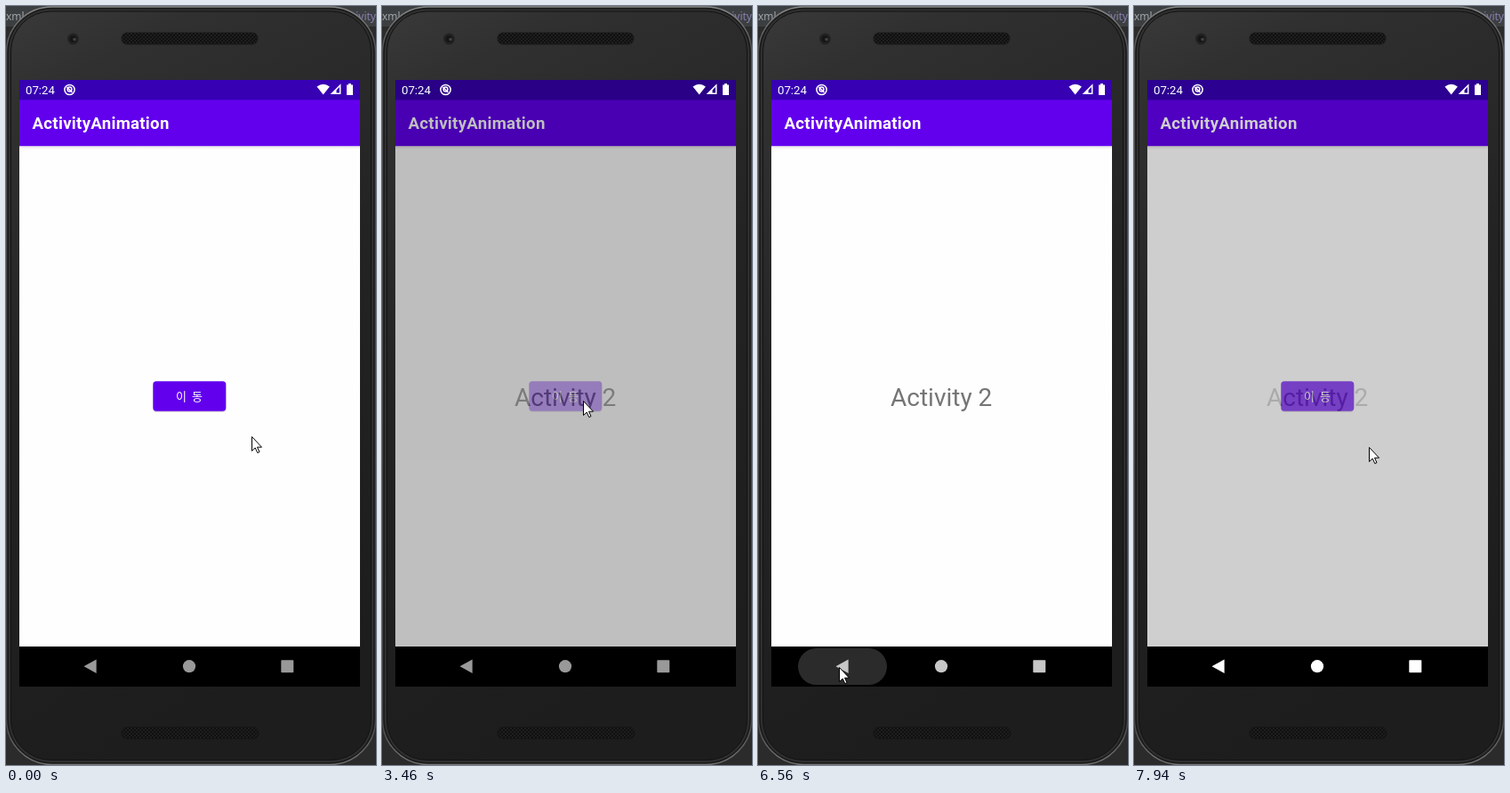
An HTML page that plays this animation: 416 by 852 pixels, repeating every 8 s.

```html
<!DOCTYPE html>
<html lang="ko">
<head>
<meta charset="utf-8">
<title>Activity fade</title>
<style>
  html, body { margin: 0; width: 100%; height: 100%; overflow: hidden; background: #2b2b2b; }
  svg { display: block; width: 416px; height: 852px; }
  text { font-family: Roboto, sans-serif; }
  .title { font-size: 18.6px; font-weight: 700; letter-spacing: .3px; fill: #fff; }
  .clock { font-size: 13.2px; fill: #fff; }
  .label { font: 500 13px "Noto Sans CJK KR", "Noto Sans CJK", sans-serif; letter-spacing: 1.16px; fill: #fff; }
  .page { font-size: 28px; fill: #757575; }
  .editor { font: 12px "Noto Sans", sans-serif; }
</style>
</head>
<body>
<svg viewBox="0 0 416 852" xmlns="http://www.w3.org/2000/svg">
  <defs>
    <linearGradient id="face" x1="0" y1="0" x2=".25" y2="1">
      <stop offset="0" stop-color="#393939"/>
      <stop offset=".12" stop-color="#303030"/>
      <stop offset=".5" stop-color="#232323"/>
      <stop offset="1" stop-color="#1d1d1d"/>
    </linearGradient>
    <linearGradient id="rim" x1="0" y1="0" x2="0" y2="1">
      <stop offset="0" stop-color="#888"/>
      <stop offset=".06" stop-color="#505050"/>
      <stop offset=".94" stop-color="#444"/>
      <stop offset="1" stop-color="#777"/>
    </linearGradient>
    <linearGradient id="shade" x1="0" y1="0" x2="0" y2="1">
      <stop offset="0" stop-opacity=".1"/>
      <stop offset="1" stop-opacity="0"/>
    </linearGradient>
    <pattern id="mesh" width="4" height="4" patternUnits="userSpaceOnUse">
      <rect width="4" height="4" fill="#1e1e1e"/>
      <circle cx="1" cy="1" r=".95" fill="#090909"/>
      <circle cx="3" cy="3" r=".95" fill="#090909"/>
    </pattern>
    <clipPath id="buttonClip"><rect x="165.3" y="421.2" width="82" height="33.5" rx="3.7"/></clipPath>
    <g id="window">
      <rect x="15" y="83" width="383" height="681" fill="#fefefe"/>
      <rect x="15" y="157" width="383" height="4" fill="url(#shade)"/>
      <rect x="15" y="83" width="383" height="74.2" fill="#6200ee"/>
      <rect x="15" y="83" width="383" height="22.4" fill="#3700b3"/>
      <text class="title" x="29.5" y="138">ActivityAnimation</text>
    </g>
  </defs>

  <rect width="416" height="852" fill="#2b2b2b"/>
  <rect width="416" height="23" fill="#3c3f41"/>
  <text class="editor" x="0" y="16" fill="#a0a4a8">xml</text>
  <text class="editor" x="416" y="16" text-anchor="end" fill="#8a80b0">Activity</text>

  <rect x=".5" y="1" width="415" height="850.5" rx="51" fill="#1b1b1b" stroke="url(#rim)" stroke-width="1.5"/>
  <rect x="3" y="3.5" width="410" height="845.5" rx="48" fill="#303030"/>
  <rect x="5.5" y="6" width="405" height="840.5" rx="45" fill="url(#face)" stroke="#121212"/>

  <rect x="130" y="30" width="153" height="13" rx="6" fill="url(#mesh)" stroke="#1a1a1a"/>
  <rect x="130" y="809.5" width="154" height="13" rx="6" fill="url(#mesh)" stroke="#151515"/>
  <circle cx="75.5" cy="37" r="6.5" fill="#222"/>
  <circle cx="75.5" cy="37" r="3.7" fill="#151515"/>
  <circle cx="77" cy="37.5" r="1.7" fill="#444"/>

  <rect x="15" y="83" width="383" height="681"/>
  <g id="first">
    <use href="#window"/>
    <rect x="165.3" y="422.4" width="82" height="33.5" rx="4" opacity=".15"/>
    <rect x="165.3" y="421.2" width="82" height="33.5" rx="3.7" fill="#6200ee"/>
    <g clip-path="url(#buttonClip)"><circle id="tap" cx="227" cy="443" fill="#fff"/></g>
    <text class="label" x="191" y="442.5">이 동</text>
  </g>
  <g id="second">
    <use href="#window"/>
    <text class="page" x="149" y="449">Activity 2</text>
  </g>

  <text class="clock" x="22" y="99">07:24</text>
  <g fill="none" stroke="#fff" stroke-width="1.5">
    <circle cx="71.5" cy="94" r="5.6"/>
    <circle cx="71.5" cy="93.5" r="2.4"/>
    <path d="M68.5 91l6 6"/>
    <path d="M366.5 98.3h9.2v-9.2z"/>
  </g>
  <g fill="#fff">
    <path d="M349.5 90.5q7.2-5.4 14.4 0l-7.2 9z"/>
    <path d="M366 99l5.5-5.5V99z"/>
    <path d="M383 88.5h2v-1.5h3v1.5h2V100h-7z"/>
  </g>

  <rect x="15" y="719" width="383" height="45"/>
  <rect id="navTap" x="45" y="721" width="100" height="41" rx="20.5" fill="#fff"/>
  <g id="nav">
    <path d="M87.5 741.2L101.6 733.4V749z"/>
    <circle cx="206" cy="741.2" r="7.1"/>
    <rect x="309.3" y="734.2" width="14" height="14" rx=".8"/>
  </g>

  <path id="cursor" d="M.5 .5V16.5L4.2 13L6.8 18.6L9 17.6L6.5 12.2H11.5Z" fill="#fff" stroke="#000"/>
</svg>
<script>
  const LOOP = 8000, STEP = 77.1, FADE = 2000;
  const OPEN = 2488, CLOSE = 6612;

  // time, x, y of the pointer tip
  const path = [
    [0, 276, 483], [771, 276, 483], [1388, 226, 443],
    [3780, 226, 443], [3932, 225, 450], [4010, 223, 459], [4163, 219, 481],
    [4472, 218, 514], [4549, 218, 514], [4626, 217, 516],
    [5010, 152, 634], [5397, 92, 741], [5474, 91, 742],
    [6650, 91, 742], [7016, 135, 684], [7247, 163, 650], [7941, 264, 495]
  ];

  const el = id => document.getElementById(id);
  const clamp = v => Math.min(1, Math.max(0, v));
  const span = (t, from, length) => clamp((t - from) / length);
  const smooth = u => (1 - Math.cos(Math.PI * u)) / 2;

  function pointer(t) {
    const i = path.findIndex(p => p[0] > t);
    if (i < 0) return path[path.length - 1].slice(1);
    const [t0, x0, y0] = path[i - 1], [t1, x1, y1] = path[i];
    const u = (t - t0) / (t1 - t0);
    return [x0 + (x1 - x0) * u, y0 + (y1 - y0) * u].map(Math.round);
  }

  function draw(now) {
    const t = Math.floor((now % LOOP) / STEP + .18) * STEP;
    const shown = smooth(span(t, OPEN, FADE)) - smooth(span(t, CLOSE, FADE));
    el('first').setAttribute('opacity', 1 - shown);
    el('second').setAttribute('opacity', shown);

    const tap = span(t, 2270, 350);
    el('tap').setAttribute('r', 75 * tap);
    el('tap').setAttribute('opacity', .24 * (1 - tap));

    const press = span(t, 6440, 480);
    el('navTap').setAttribute('opacity', press > 0 ? .22 * (1 - press) : 0);
    const grey = Math.round(153 + 102 * span(t, 6440, 250));
    el('nav').setAttribute('fill', `rgb(${grey},${grey},${grey})`);

    el('cursor').setAttribute('transform', `translate(${pointer(t)})`);
  }

  const start = performance.now();
  function tick() {
    draw(performance.now() - start);
    requestAnimationFrame(tick);
  }
  tick();
</script>
</body>
</html>
```
